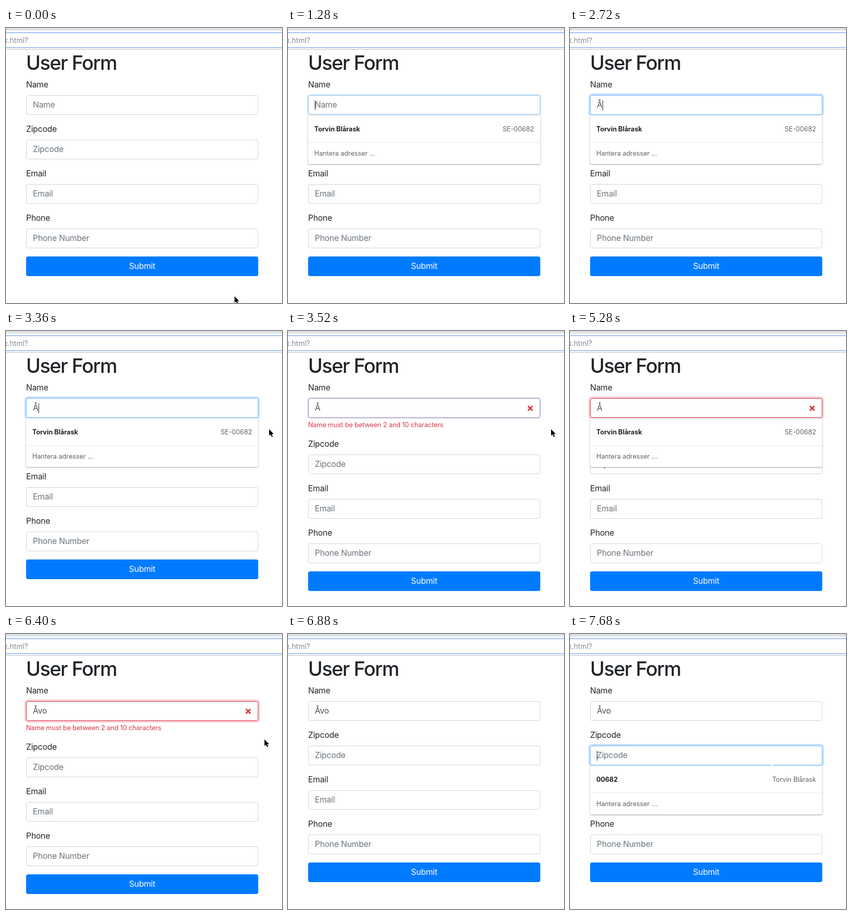
Recreate the animation shown at these times as an HTML page. Size 535x532 px, loop 8 s.

```html
<!DOCTYPE html>
<html lang="en">
<head>
<meta charset="utf-8">
<title>User Form</title>
<style>
html, body { margin: 0; width: 100%; height: 100%; overflow: hidden; background: #fff; }
#stage {
  position: relative; width: 535px; height: 532px; overflow: hidden; background: #fff;
  font: 15.8px/24px Inter, "Open Sans", sans-serif; font-optical-sizing: none;
  letter-spacing: -.2px; color: #212529; white-space: nowrap; cursor: default;
}
#tabs { position: absolute; top: 0; width: 100%; height: 5px; background: #dfe2e8; }
#address {
  position: absolute; top: 8px; left: -20px; width: 575px; height: 27px;
  border: solid #a4c5f8; border-width: 2px 0; color: #85898e; font-size: 14px; line-height: 27px;
}
#address span { position: absolute; right: 512px; letter-spacing: 0; }
#rule { position: absolute; top: 41px; width: 100%; height: 1px; background: #b9bdc3; }
#form { position: absolute; left: 39px; top: 42px; width: 450px; }
h1 { margin: 0 0 8px; font-size: 38px; line-height: 50px; height: 48px; font-weight: 500; letter-spacing: -1.45px; }
.group { margin-bottom: 16px; }
.label { height: 24px; margin-bottom: 8px; }
.input {
  position: relative; box-sizing: border-box; height: 38px; padding: 6px 12px;
  border: 1px solid #ced4da; border-radius: 4px; color: #495057;
}
.hint { position: absolute; left: 12px; color: #6c757d; }
.caret { position: absolute; top: 9px; width: 1px; height: 19px; background: #222; }
.input svg { position: absolute; right: 13px; top: 13px; }
.error { height: 19.2px; margin-top: 4px; font-size: 12.8px; line-height: 19.2px; letter-spacing: -.1px; color: #dc3545; }
.button { height: 38px; line-height: 38px; border-radius: 4px; background: #007bff; color: #fff; text-align: center; }
[data-look=focusing] { border-color: #90c2f3; box-shadow: 0 0 0 2px rgba(0,123,255,.17); }
[data-look=focus] { border-color: #80bdff; box-shadow: 0 0 0 3.2px rgba(0,123,255,.25); }
[data-look=failing] { border-color: #9a87b9; box-shadow: 0 0 0 2px rgba(60,90,240,.15); }
[data-look=bad] { border-color: #dc3545; }
[data-look=badFocusing] { border-color: #dc3545; box-shadow: 0 0 0 2px rgba(220,53,69,.17); }
[data-look=badFocus] { border-color: #dc3545; box-shadow: 0 0 0 3.2px rgba(220,53,69,.25); }
[data-look=clearing] { border-color: #d58e98; box-shadow: 0 0 0 1.6px rgba(220,53,69,.13); }
#popup {
  position: absolute; left: 39px; width: 450px; height: 94px; background: #fff;
  border-radius: 0 0 3px 3px; box-shadow: 0 1px 3px rgba(0,0,0,.38);
  font-size: 12.7px; letter-spacing: 0; color: #5f6368;
}
#popup div { box-sizing: border-box; padding: 0 12px; display: flex; justify-content: space-between; }
#popup .entry { height: 53px; line-height: 53px; border-bottom: 1px solid #e6e8eb; }
#popup .manage { line-height: 41px; }
#popup b { color: #202124; font-weight: 700; }
#pointer { position: absolute; left: 0; top: 0; overflow: visible; }
[hidden] { display: none !important; }
</style>
</head>
<body>
<div id="stage">
  <div id="tabs"></div>
  <div id="address"><span>x.html?</span></div>
  <div id="rule"></div>
  <div id="form"><h1>User Form</h1></div>
  <div id="popup">
    <div class="entry"><b></b><span></span></div>
    <div class="manage">Hantera adresser …</div>
  </div>
  <svg id="pointer" width="1" height="1">
    <path id="arrow" d="M0 0V12.6L2.9 10L5 14.8L7.1 13.9L5.1 9.2H9Z" stroke="#fff" stroke-width="1.6" paint-order="stroke"/>
    <g id="beam" fill="none">
      <path id="beamLine" d="M-3 -7.5Q-.3 -7.5 0 -5.5Q.3 -7.5 3 -7.5M0 -5.5V5.5M-3 7.5Q-.3 7.5 0 5.5Q.3 7.5 3 7.5M-2.2 2.5H2.2" stroke="#fff" stroke-width="2.4"/>
      <use href="#beamLine" style="stroke:#444"/>
    </g>
  </svg>
</div>
<script>
const LOOP = 8000;
const $ = (selector, root = document) => root.querySelector(selector);
const form = $('#form');

function addField(label, hint = label) {
  const group = document.createElement('div');
  group.className = 'group';
  group.innerHTML = `<div class="label">${label}</div>
    <div class="input"><span class="hint">${hint}</span><span class="value"></span><span class="caret" hidden></span></div>`;
  form.append(group);
  return group;
}

const nameField = addField('Name');
const zipField = addField('Zipcode');
addField('Email');
addField('Phone', 'Phone Number');
form.insertAdjacentHTML('beforeend', '<div class="button">Submit</div>');
$('.input', nameField).insertAdjacentHTML('beforeend',
  '<svg class="cross" width="11" height="11"><path d="M2 2L9 9M9 2L2 9" stroke="#dc3545" stroke-width="2.9" stroke-linecap="round"/></svg>');
nameField.insertAdjacentHTML('beforeend', '<div class="error">Name must be between 2 and 10 characters</div>');

const person = 'Torvin Blårask';
const entries = {
  name: { top: 169, main: person, side: 'SE-00682' },
  zip: { top: 255, main: '00682', side: person }
};

// Each track is a list of [start time, value]; values hold until the next one.
const tracks = {
  nameLook: [[0, ''], [1280, 'focusing'], [1440, 'focus'], [3520, 'failing'], [3680, 'bad'],
    [4800, 'badFocusing'], [4960, 'badFocus'], [6560, 'clearing'], [6720, '']],
  zipLook: [[0, ''], [7520, 'focusing'], [7680, 'focus']],
  text: [[0, ''], [2400, 'Å'], [5440, 'Åv'], [5760, 'Åvo']],
  invalid: [[0, false], [3520, true], [6560, false]],
  popup: [[0, ''], [1280, 'name'], [3520, ''], [4800, 'name'], [5440, ''], [7520, 'zip']],
  caret: [[0, ''], [1280, 'name'], [1760, ''], [2240, 'name'], [2880, ''], [3360, 'name'], [3520, ''],
    [4800, 'name'], [5280, ''], [5440, 'name'], [6240, ''], [7520, 'zip']],
  pointer: [[0, [443, 519]], [160, [418, 320]], [320, [360, 115]], [480, [371, 134]], [640, [377, 143]],
    [2720, [352, 158]], [2880, [388, 158]], [3040, [450, 165]], [3200, [498, 182]], [3360, [510, 190]],
    [3840, [508, 192]], [4000, [478, 187]], [4160, [428, 173]], [4320, [386, 157]], [4480, [377, 153]],
    [6080, [412, 160]], [6240, [478, 188]], [6400, [501, 204]],
    [6880, [448, 226]], [7040, [391, 241]], [7200, [391, 250]]]
};

const at = (track, time) => track.findLast(([start]) => start <= time)[1];

function showField(field, look, text, caret) {
  const input = $('.input', field), value = $('.value', field), mark = $('.caret', field);
  input.dataset.look = look;
  value.textContent = text;
  $('.hint', field).hidden = text !== '';
  mark.hidden = !caret;
  mark.style.left = 12 + value.offsetWidth + 'px';
}

function showPopup(key) {
  const popup = $('#popup'), entry = entries[key];
  popup.hidden = !entry;
  if (!entry) return;
  popup.style.top = entry.top + 'px';
  $('b', popup).textContent = entry.main;
  $('.entry span', popup).textContent = entry.side;
}

function showPointer([x, y]) {
  const overInput = x > 39 && x < 489 && (y > 130 && y < 168 || y > 216 && y < 254);
  $('#pointer').style.transform = `translate(${x + (overInput ? .5 : 0)}px, ${y + (overInput ? .5 : 0)}px)`;
  $('#arrow').style.display = overInput ? 'none' : '';
  $('#beam').style.display = overInput ? '' : 'none';
}

function render(time) {
  const now = {};
  for (const key in tracks) now[key] = at(tracks[key], time);
  showField(nameField, now.nameLook, now.text, now.caret === 'name');
  showField(zipField, now.zipLook, '', now.caret === 'zip');
  $('.error').hidden = !now.invalid;
  $('.cross').style.display = now.invalid ? '' : 'none';
  showPopup(now.popup);
  showPointer(now.pointer);
}

const begin = performance.now();
function tick() {
  render((performance.now() - begin) % LOOP);
  requestAnimationFrame(tick);
}
tick();
</script>
</body>
</html>
```
